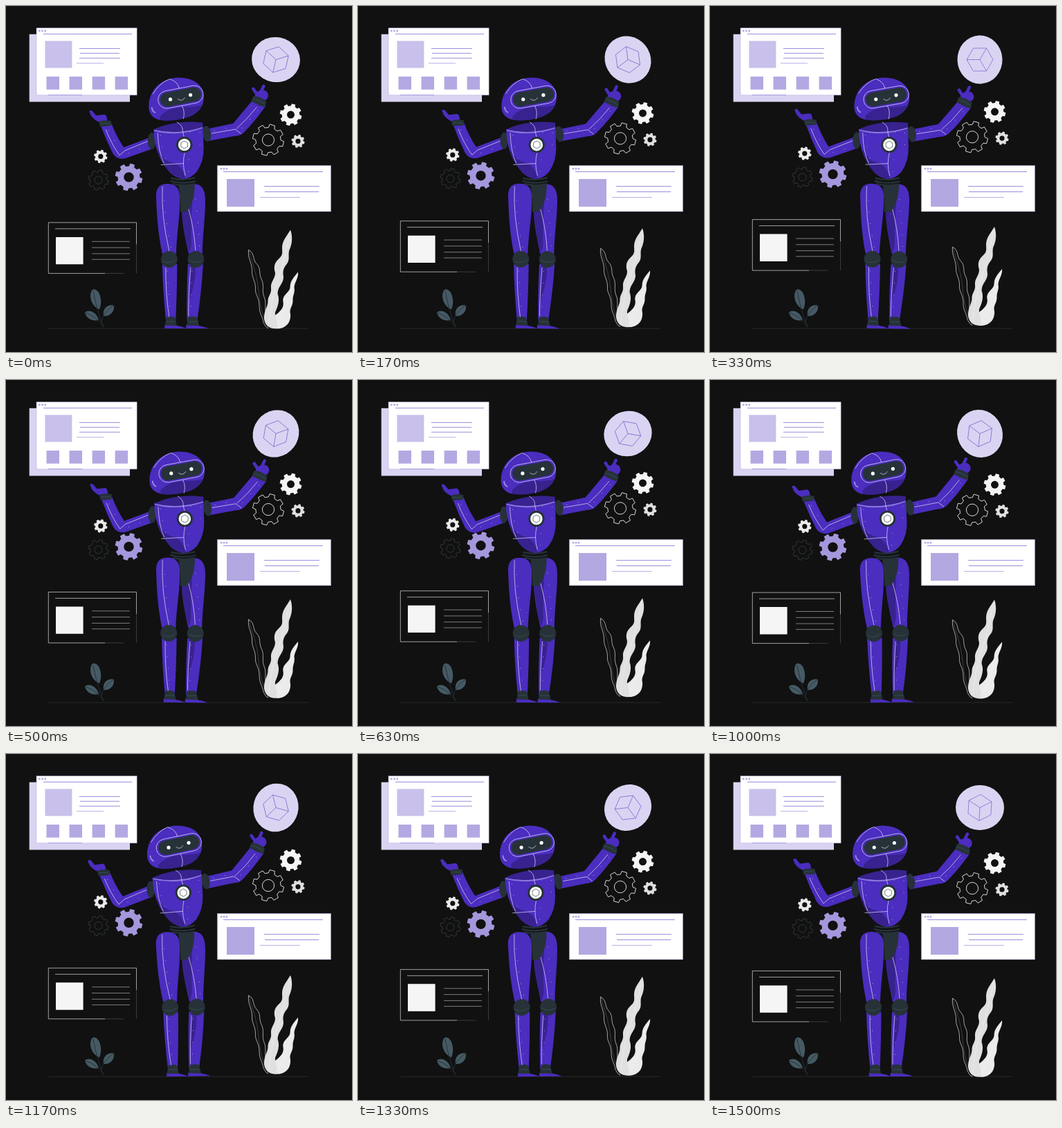
An HTML page for the animation above (1540 ms loop, 500 by 500 pixels).

```html
<!DOCTYPE html>
<html lang="en">
<head>
<meta charset="utf-8">
<title>Robot</title>
<style>
  html, body { margin: 0; width: 100%; height: 100%; overflow: hidden; background: #111; }
  svg { display: block; width: 100vw; height: 100vh; }
  .body { fill: #4b2dbf; }
  .joint { fill: #263238; }
  .shade { fill: #000; opacity: .25; }
  .pale { fill: #dad4f2; }
  .mid { fill: #b4a8e2; }
  .panel { fill: #fff; stroke: #a99be0; stroke-width: .4; }
  .rule { fill: none; stroke: #7c66d0; stroke-width: .75; }
  .seam { fill: none; stroke: #e4defa; stroke-width: .7; stroke-linecap: round; }
  .rivet { fill: none; stroke: #d8d0f5; stroke-width: 1; stroke-linecap: round; stroke-dasharray: 0 17; }
  .wire { fill: none; stroke: #eee; stroke-width: .65; }
</style>
</head>
<body>
<svg viewBox="0 0 500 500">
  <path d="M61 466H437" stroke="#2b3033" stroke-width=".8"/>

  <!-- upper left window -->
  <path class="pale" d="M33.700 40.800H179V138.500H33.700Z"/>
  <path class="panel" d="M44 31.700H189.200V128.800H44Z"/>
  <path class="mid" d="M58.500 102h18.500v18.700h-18.500zM91.500 102h18.500v18.700h-18.500zM124.600 102h18.500v18.700h-18.500zM157.600 102h18.500v18.700h-18.500z"/>
  <path fill="#c9c0eb" d="M56.400 50.400h39v39h-39z"/>
  <path class="rule" d="M54 40.500H182M106 61.500H165M107 68.300H164M106 75.300H165"/>
  <path class="rule" opacity=".7" d="M102 82.700H141M61 128.500H110"/>
  <g class="mid"><circle cx="48.300" cy="36" r="1.400"/><circle cx="52.500" cy="36" r="1.400"/><circle cx="56.700" cy="36" r="1.400"/></g>

  <!-- right window -->
  <path class="panel" d="M305.400 230.500H469.500V297H305.400Z"/>
  <path class="mid" d="M319 250h40v40h-40z"/>
  <path class="rule" d="M314 239.500H458M373 260.600H453M374 268.500H452"/>
  <path class="rule" opacity=".7" d="M367 276.500H425"/>
  <g class="mid"><circle cx="311" cy="235.200" r="1.400"/><circle cx="315" cy="235.200" r="1.400"/><circle cx="319" cy="235.200" r="1.400"/></g>

  <!-- small dark plant -->
  <g fill="#455a64">
    <path d="M135 438.500C124 434 119 420 124 411C128 407 135 412 136.500 421C138 428 137 433 135 438.500Z"/>
    <path d="M141 448C139 438 146 431 155.500 432.500C158 440 151 449 141 448Z"/>
    <path d="M134 454C125 456 116 452 114 442.500C120 438 131 442 134 454Z"/>
  </g>
  <path d="M126 412Q131 440 141 464M155 433Q138 446 138 456M115 443Q133 450 141 464" fill="none" stroke="#263238" stroke-width=".9"/>

  <g id="spinner">
    <ellipse class="pale" rx="35" ry="32.500"/>
    <path class="rule" transform="rotate(2)" d="M0 -19L16.500 -9.500V9.500L0 19L-16.500 9.500V-9.500ZM0 0V19M0 0L-16.500 -9.500M0 0L16.500 -9.500"/>
  </g>

  <g id="floater">
    <g id="gears"></g>
    <path class="wire" d="M188.500 345V313.500H61.300V387H143M71 322.500H180"/>
    <path class="wire" opacity=".3" d="M188.500 345V387M143 387H170"/>
    <path class="wire" opacity=".75" d="M124 340.900H179M124 349.700H179M124 358.500H179M124 366.800H179"/>
    <path fill="#f5f5f5" d="M72 334.500h39.600v39.400H72z"/>
    <path class="wire" d="M350.500 353C349 366 356 372 355.500 384C355 393 361 398 360.500 410C360 418 366 422 366 434C366 446 371 449 372 458Q375 465 379 466.500M350.500 353C360 358 356 367 362 373C369 380 365 387 369 395C374 404 369 412 373 421C377 430 373 438 376 448"/>
    <path class="wire" opacity=".3" d="M351 354C356 372 363 390 365 412S370 446 379 466"/>
    <path fill="#ebebeb" d="M422 385C423 394 417 399 416.500 407C418 416 414 418 414.500 427C414 436 409 437 411 446C412 460 402 467 392 466.800L385 450C398 442 402 435 400.500 428C399 417 410 415 410.500 407C411 397 415 394 422 385Z"/>
    <path fill="#e0e0e0" d="M411 324C415 335 413 346 409.500 353C407 360 411 366 406 373C400 380 400 385 401 392C401 402 393 405 392.500 416C396 426 393 434 389 443C388 452 394 459 392 466.800C381 468 372 461 373 449C374 438 379 434 378.500 426C379 419 384 416 383 408C382 399 389 395 389 386C387 379 387 373 393 367C401 360 399 357 399 350C399 340 405 334 411 324Z"/>
    <path d="M410 328Q402 370 392 399T380 461M420 391Q409 417 406 431T390 464" fill="none" stroke="#f2f2f2" stroke-width=".6"/>
  </g>

  <g id="robot">
    <!-- legs -->
    <g class="body">
      <path d="M217 277C216 262 223 257 233 257C246 257 251 264 251 276C252 302 247 326 246 358H226C220 330 218 304 217 277Z"/>
      <path d="M271 257C283 257 288 265 288 281C288 306 284 334 284 358H264C259 334 255 318 254 297Q266 286 271 257Z"/>
      <path d="M226 373Q227 412 231.500 455H245.500Q247.500 412 247.500 373Z"/>
      <path d="M263 373Q261 412 262 455H276.500Q283 412 285 373Z"/>
      <path d="M229.600 461Q246 460 260 465.500V466H229.600Z"/>
      <path d="M260.600 461Q278 460 292 465.500V466H260.600Z"/>
    </g>
    <path class="shade" d="M254 297Q266 288 270 270Q267 305 268 345L265 357Q256 325 254 297ZM266 375L274 378Q274 404 264 428Q268 398 266 375Z"/>
    <path class="joint" d="M249 258H272.500Q273 282 262 296Q256 300 252 297Q252 276 249 258Z"/>
    <path class="joint" d="M232 450Q238.500 447 244.500 450L247.500 462L230 461.500ZM263.500 450Q270.500 447 276.500 450L279.500 462L261.500 461.500Z"/>
    <circle class="joint" cx="236" cy="366" r="12"/><circle class="joint" cx="274.500" cy="366" r="12"/>
    <path d="M227 369Q236 374 245 367M265 367Q274 373 283 368M232 456H245M263 456H277" fill="none" stroke="#455a64" stroke-width=".6"/>
    <path class="seam" d="M226 261Q224 303 236 354M264 294Q272 322 274 353M231 378Q231 416 236 449M267 378Q264 416 264 448"/>
    <path class="rivet" d="M229 281Q231 318 239 350M274 279Q278 315 280 350M233 383L238 446M269 383L267 446"/>
    <path d="M238 249Q256 253 273 248M237 253Q256 258 274 253M240 257Q256 261 273 257" fill="none" stroke="#263238" stroke-width="2.300"/>

    <!-- arms -->
    <path class="body" d="M209 189.500L170 204.500Q160 190 152 170L137 174Q145 195 154 213Q160 223 172 220.500L211 206.500Z"/>
    <path class="body" d="M291 177.500L328 169.500L355 137L375 144.500Q358 168 344 182Q339 187.500 331 187.500L292 195Z"/>
    <path class="seam" d="M144 179Q153 201 164 216L172 209L206 195M297 184L331 178L339 184M333 177Q348 164 362 146"/>
    <path class="rivet" d="M148 180L164 207M177 213L207 202M301 180L329 174M341 176L367 147"/>
    <path class="body" d="M120 152.500Q122 149.500 125 152.500L130 158.500L142 157Q146 158 146 167L134 168Q126 164 122.500 158.500Z"/>
    <path class="joint" d="M134 167Q143 164 152 166.500L151.500 173Q143 175 135 174Z"/>
    <circle class="body" cx="371" cy="129" r="7.700"/>
    <path d="M357 119.500L364 130M372 115.500L366 128" stroke="#4b2dbf" stroke-width="4.500" stroke-linecap="round"/>
    <path class="body" d="M360 125L368 121L375 134L369 138L359 133Z"/>
    <path class="joint" d="M357 130Q368 130 376 138L374 146Q365 144 354 137Z"/>
    <path d="M136 170H150M357 134Q367 136 374 142" stroke="#455a64" fill="none" stroke-width=".6"/>
    <ellipse class="joint" cx="210.500" cy="195" rx="5.800" ry="12"/>
    <ellipse class="joint" cx="290" cy="184.500" rx="6" ry="11.500" transform="rotate(-8 290 184.500)"/>

    <!-- torso -->
    <path class="body" d="M213 178.500Q244 164 284 168.500L285.500 205Q286 224 276 239Q268 249 256 250Q241 248 232 235Q215 214 213 178.500Z"/>
    <path class="shade" d="M213 178.500Q244 164 284 168.500L284.300 175Q248 187 213 178.500ZM218 206Q228 225 243 227Q256 232 259 250Q241 248 232 235Q223 224 218 206Z"/>
    <path d="M214 179Q248 187 284 175L284 176.500Q248 189.500 214 180.500Z" fill="#8d78dc"/>
    <path class="seam" d="M247 168Q256 173 255 181L257 189M258 212Q254 228 259 245M224 229.500L256 227.500M219 184Q220 211 228 227"/>
    <path class="rivet" d="M223 187Q225 207 231 223M266 182L282 179M264 222L263 243M280 183V213"/>
    <circle class="joint" cx="257.500" cy="200.500" r="11.700"/><circle fill="#fff" cx="257.500" cy="200.500" r="8.800"/>
    <path d="M257.500 195L262.300 197.700V203.300L257.500 206L252.700 203.300V197.700Z" fill="none" stroke="#37474f" stroke-width=".7"/>

    <!-- head -->
    <path class="body" d="M206 146C206 120 225 104 249 103.500C272 103.500 285 115 285.500 130C286 149 274 160 250 164C227 168 207 166 206 146Z"/>
    <path class="shade" d="M222 160Q232 147 256 146Q272 146 283 143Q278 159 250 164Q232 167 222 165Z"/>
    <path class="seam" d="M236 105.500Q248 109 250 119M254 144Q259 153 256 163M212 127Q221 112 235 106"/>
    <path d="M210.500 147Q211 152 215 154" fill="none" stroke="#9985e3" stroke-width="2" stroke-linecap="round"/>
    <g transform="rotate(-11 252 131.500)">
      <rect x="219" y="118.800" width="66" height="25.400" rx="12.500" fill="#4b2dbf" stroke="#ded7fa" stroke-width=".7"/>
      <rect x="222" y="121.200" width="60" height="20.600" rx="10" class="joint"/>
    </g>
    <circle fill="#fff" cx="237.200" cy="135" r="2.600"/><circle fill="#fff" cx="266.300" cy="128.500" r="2.600"/>
    <path class="seam" d="M248 134.500Q254 139 258 132.500"/>
  </g>
</svg>
<script>
  const LOOP = 1540, LEAD = 45;
  const byId = id => document.getElementById(id);
  const robot = byId('robot'), floater = byId('floater'), spinner = byId('spinner');

  function circle(r) {
    return `M${r} 0A${r} ${r} 0 1 0 ${-r} 0A${r} ${r} 0 1 0 ${r} 0Z`;
  }

  // Eight tapered teeth around a ring with a round hole.
  function gear(x, y, radius, hole, paint) {
    const points = [];
    for (let tooth = 0; tooth < 8; tooth++) {
      for (const [offset, scale] of [[-14, .8], [-9.5, 1], [9.5, 1], [14, .8]]) {
        const a = (tooth * 45 + 15 + offset) * Math.PI / 180, r = radius * scale;
        points.push((r * Math.cos(a)).toFixed(2) + ' ' + (r * Math.sin(a)).toFixed(2));
      }
    }
    return `<path transform="translate(${x} ${y})" d="M${points.join('L')}Z${circle(hole)}"
      fill-rule="evenodd" stroke-linejoin="round" ${paint}/>`;
  }

  byId('gears').innerHTML =
    gear(411.5, 157.7, 16, 5.5, 'fill="#f5f5f5"') +
    gear(422, 196, 9.7, 3.6, 'fill="#e0e0e0"') +
    gear(379, 194.2, 22.7, 8.6, 'fill="none" stroke="#eee" stroke-width=".9"') +
    gear(136.8, 218, 9.8, 3.6, 'fill="#ebebeb"') +
    gear(177.5, 248, 20, 7.2, 'fill="#a597dc"') +
    gear(133.5, 252.2, 14.6, 5.6, 'fill="none" stroke="#343b3f" stroke-width=".9"');

  function draw(now) {
    const p = (now + LEAD) % LOOP / LOOP;
    const lift = -10 * (1 - Math.abs(1 - 2 * p));
    const sway = p < .25 ? 4 * p : p < .75 ? 2 - 4 * p : 4 * p - 4;
    floater.setAttribute('transform', `translate(0 ${lift})`);
    robot.setAttribute('transform', `rotate(${sway} 250 285)`);
    spinner.setAttribute('transform', `translate(390 77.5) rotate(${360 * p})`);
  }

  const start = performance.now();
  function tick() {
    draw(performance.now() - start);
    requestAnimationFrame(tick);
  }
  tick();
</script>
</body>
</html>
```
